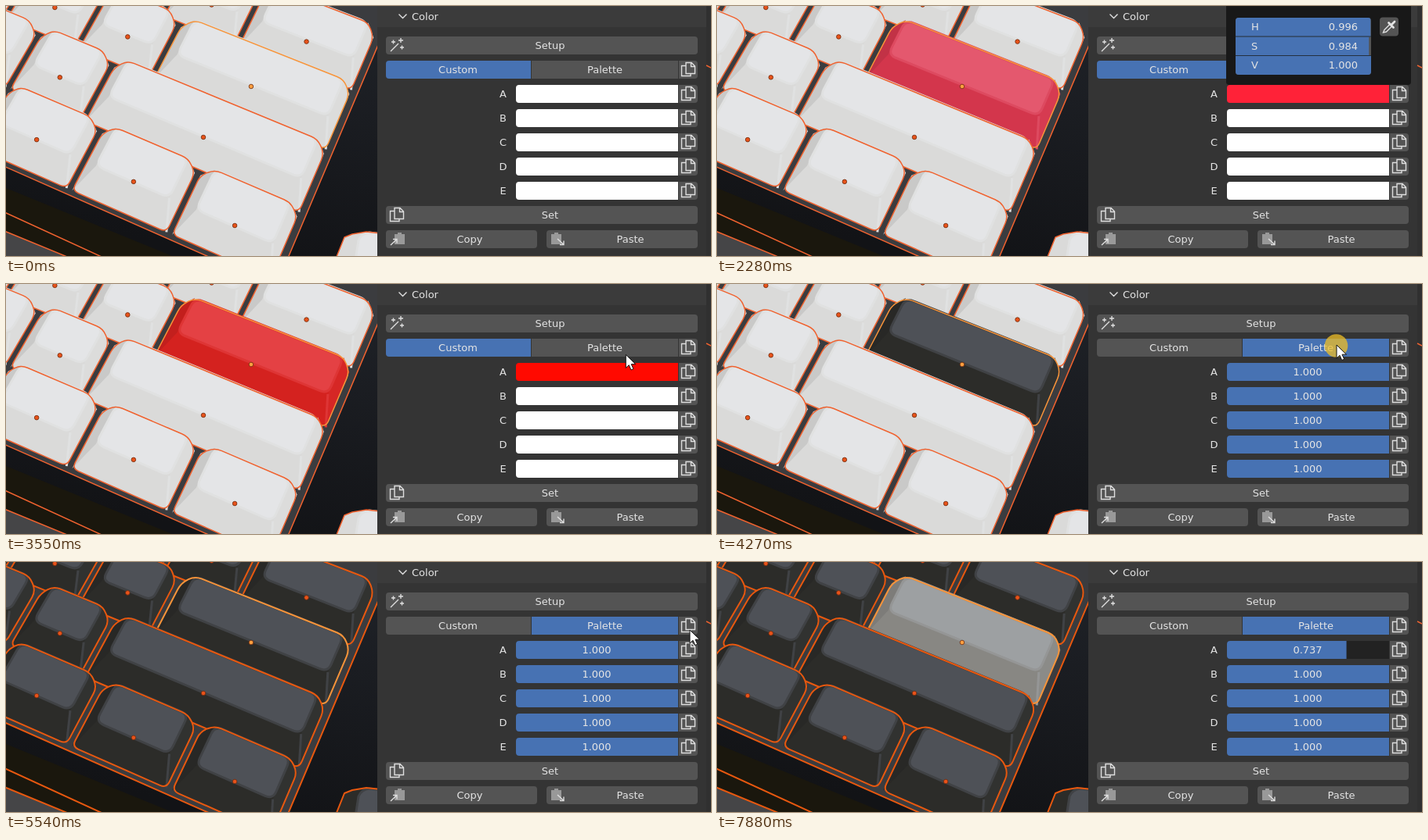
These frames come from a looping animation (900 by 320 pixels, 8 s). An HTML page:

```html
<!DOCTYPE html>
<html lang="en">
<head>
<meta charset="utf-8">
<title>Keycap colors</title>
<style>
  html, body { margin: 0; width: 100%; height: 100%; overflow: hidden; background: #343434; }
  svg { display: block; width: 900px; height: 320px; font: 13px "DejaVu Sans", sans-serif; }
  text { fill: #e4e4e4; white-space: pre; }
  .mid { text-anchor: middle; }
  .end { text-anchor: end; }
  .btn { fill: #545454; }
  .blue { fill: #4772b3; }
  .icon { fill: none; stroke: #dedede; stroke-width: 1.4; }
  .edge { fill: none; stroke: #f0622f; stroke-width: 1.5; stroke-linejoin: round; }
  .dark .edge { stroke: #e8580f; stroke-width: 2; }
  #hero .edge { stroke: #f8943a; }
  .top { fill: var(--top); stroke: var(--rim); stroke-width: 3; }
  .front { fill: var(--front); }
  .right { fill: var(--right); }
  .left { fill: var(--left); }
  .ridge { fill: none; stroke: var(--rim); stroke-width: 3; }
  .dot { fill: #e8531a; stroke: #6b2a10; stroke-width: .8; }
  .dot.on { fill: #ffa040; }
</style>
</head>
<body>
<svg id="stage" viewBox="0 0 900 320" xmlns="http://www.w3.org/2000/svg"></svg>
<script>
const $ = id => document.getElementById(id);
const clamp = x => Math.min(1, Math.max(0, x));
const ease = x => x * x * (3 - 2 * x);
const lerp = (a, b, k) => a + (b - a) * k;

// Perspective view of the key grid: u runs left from the right edge, v counts rows from the front
function project(u, v, lift = 0) {
  const d = 1 - .0178 * u + .028 * v;
  return [(358.8 + 101.6 * u + 46.1 * v) / d + 11 * lift,
          (310 + 41.4 * u - 76.3 * v) / d - 25 * lift];
}

// Corners of one cap layer: back left, back right, front right, front left
function quad(key, du, dv, lift) {
  const { left, right, row } = key;
  return [[left + du, row + .5 - dv], [right - du, row + .5 - dv],
          [right - du, row - .5 + dv], [left + du, row - .5 + dv]].map(([u, v]) => project(u, v, lift));
}

// Closed outline with rounded corners
function rounded(pts, r) {
  const toward = (a, b) => {
    const dx = b[0] - a[0], dy = b[1] - a[1];
    const k = Math.min(r / Math.hypot(dx, dy), .5);
    return (a[0] + dx * k).toFixed(1) + ' ' + (a[1] + dy * k).toFixed(1);
  };
  const n = pts.length;
  return pts.map((p, i) =>
    `${i ? 'L' : 'M'}${toward(p, pts[(i + n - 1) % n])}Q${p} ${toward(p, pts[(i + 1) % n])}`).join('') + 'Z';
}

// Width of the last key in each row, then of the others, front row first
const keys = [[1.25, 1.25], [2.75, 1], [2.25, 1], [1.5, 1]].flatMap(([last, width], row) =>
  [0, 1, 2, 3].map(i => {
    const right = i ? -last - (i - 1) * width : 0;
    return { row, right, left: right - (i ? width : last), hero: row === 2 && i === 0 };
  })).reverse();

function drawCap(key) {
  const base = quad(key, .035, .035, 0), face = quad(key, .165, .19, 1);
  const outline = rounded([base[3], base[0], face[0], face[1], base[1], base[2]], 9);
  return `<g ${key.hero ? 'id="hero"' : ''}>
    <path class="front" d="${outline}"/>
    <polygon class="left" points="${[base[3], base[0], face[0], face[3]].join(' ')}"/>
    <polygon class="right" points="${[face[1], base[1], base[2], face[2]].join(' ')}"/>
    <path class="ridge" d="M${face[2]}L${base[2]}"/>
    <path class="top" d="${rounded(face, 11)}"/>
    <path class="edge" d="${outline}"/></g>`;
}

function drawDot({ left, right, row, hero }) {
  const [x, y] = project((left + right) / 2, row);
  return `<circle class="dot ${hero ? 'on' : ''}" cx="${x}" cy="${y}" r="2.8"/>`;
}

const plate = [project(-7, 5), project(.05, 5), project(.05, -.54), project(-7, -.54)];
const scene = `
  <rect width="474" height="320" fill="url(#floor)"/>
  <path d="M0 233L212 320H0Z" fill="#1a170d"/>
  <path d="M0 289L75 320H0Z" fill="#454547"/>
  <path class="edge" d="M-2 264L122 321M-2 288L78 321"/>
  <polygon class="edge" style="fill:#3b3c3f" points="${plate.join(' ')}"/>
  <path class="front" d="M420 326L432 296 442 292 460 289 480 291V326Z"/>
  <path class="top" d="M446 326L450 300Q454 291 464 290L480 292V326Z"/>
  <path class="edge" d="M420 326L432 296 442 292 460 289 480 291"/>
  ${keys.map(drawCap).join('')}${keys.map(drawDot).join('')}`;

// Panel widgets; y is always the middle of a row
const label = (x, y, s, cls = 'mid', id = '') => `<text id="${id}" class="${cls}" x="${x}" y="${y + 5}">${s}</text>`;
const button = (x, y, w) => `<rect class="btn" x="${x}" y="${y - 11}" width="${w}" height="23" rx="4"/>`;
const leftEnd = (x, y, w, attr) =>
  `<path ${attr} d="M${x + w} ${y - 11}H${x + 4}q-4 0-4 4v15q0 4 4 4H${x + w}Z"/>`;
const pages = (x, y) => `<path class="icon" transform="translate(${x} ${y})"
  d="M-3-8.500H4L8.500-4V5.500H-3ZM3.500-8.500V-3.500H8.500M-3-4.500H-8.500V8.500H3V5.500"/>`;
const copyEnd = y => `<path class="btn" d="M859 ${y - 11}h20q4 0 4 4v15q0 4-4 4h-20Z"/>${pages(871, y)}`;
const clip = (x, y) => `<path fill="#999" d="M${x} ${y - 6}h4v-2h5v2h4v13h-13Z"/>`;
const rows = [...'ABCDE'].map((name, i) => ({ name, y: 112 + 31 * i }));

const panel = `
  <rect x="474" width="426" height="320" fill="#343434"/>
  <rect x="474" width="420" height="27" fill="#3b3b3b"/>
  <rect x="894" width="6" height="320" fill="#303030"/>
  <path class="edge" d="M894 76L900 79"/>
  <path class="icon" d="M501.500 10.500L506.500 15.500 511.500 10.500"/>
  ${label(518, 13, 'Color', '')}
  ${button(485, 50, 398)}${label(694.5, 50, 'Setup')}
  <path class="icon" d="M491 58L501 48M492 46h5M494.500 43.500v5M501 44h6M504 41v6M503 53h5M505.500 50.500v5"/>
  ${leftEnd(485, 81, 185, 'id="tabCustom"')}
  <rect id="tabPalette" x="671" y="70" width="187" height="23"/>
  ${label(577, 81, 'Custom')}${label(764.5, 81, 'Palette')}${copyEnd(81)}
  ${rows.map(({ name, y }) => label(634.5, y, name) + copyEnd(y)).join('')}
  <g id="custom">${rows.map(({ name, y }) => leftEnd(651, y, 207, `id="swatch${name}" fill="#fff"`)).join('')}</g>
  <g id="palette">${rows.map(({ name, y }) =>
    leftEnd(651, y, 207, 'fill="#222"') + leftEnd(651, y, 207, `id="bar${name}" class="blue"`) +
    label(754, y, '1.000', 'mid', 'value' + name)).join('')}</g>
  ${button(485, 267, 398)}${pages(499, 267)}${label(694.5, 267, 'Set')}
  ${button(485, 298, 193)}${clip(496, 298)}${label(592, 298, 'Copy')}
  <path class="icon" d="M491 306L499 298.500M494 298.500H499V303.500"/>
  ${button(690, 298, 193)}${clip(696, 298)}${label(797, 298, 'Paste')}
  <path class="icon" d="M704 298L712 305.500M707 305.500H712V300.500"/>`;

const picker = `<g id="picker">
  <path fill="#181818" d="M650 0H886V97q0 4-4 4H654q-4 0-4-4Z"/>
  <g clip-path="url(#hsvBox)">
    <rect class="btn" x="662" y="15" width="173" height="73"/>
    ${[0, 1, 2].map(i => `<rect id="hsvBar${i}" class="blue" x="662" y="${15 + 24.5 * i}" height="24.500"/>`).join('')}
    <path d="M662 39H835M662 63.500H835" stroke="#24303f"/>
  </g>
  ${[...'HSV'].map((c, i) => label(682, 26 + 24.5 * i, c, '') + label(818, 26 + 24.5 * i, '', 'end', 'hsv' + i)).join('')}
  <rect class="btn" x="846" y="14.500" width="24" height="24" rx="4"/>
  <path class="icon" d="M850.500 34L852 30.500 859 23.500 861.500 26 854.500 33Z"/>
  <path d="M857.500 21.500L863.500 27.500M860.500 24.500L865 20" stroke="#e4e4e4" stroke-width="2.800" stroke-linecap="round"/>
</g>`;

$('stage').innerHTML = `
  <defs>
    <linearGradient id="floor" x1=".9" y1="0" x2=".6" y2="1">
      <stop stop-color="#202329"/><stop offset="1" stop-color="#121316"/>
    </linearGradient>
    <clipPath id="hsvBox"><rect x="662" y="15" width="173" height="73" rx="4"/></clipPath>
    <clipPath id="view"><rect width="474" height="320"/></clipPath>
  </defs>
  <g id="board" clip-path="url(#view)">${scene}</g>${panel}${picker}
  <circle id="ring" r="14.800" fill-opacity=".74"/>
  <path id="cursor" fill="#fff" stroke="#111" stroke-linejoin="round" d="M0 0V17L4 13.300 6.700 19.500 9.700 18.200 7 12.200H12.500Z"/>`;

// Colors as top and front; the other faces follow from these
const paint = {
  white: ['#e4e5e7', '#dadad9'],
  pink: ['#e4586e', '#d3364c'],
  red: ['#e44144', '#d4221f'],
  dark: ['#4e5157', '#2c2c29'],
  grey: ['#9da0a2', '#888783'],
};
const hex = rgb => '#' + rgb.map(c => Math.round(c).toString(16).padStart(2, '0')).join('');
const mix = (a, b, k) => hex([1, 3, 5].map(i =>
  lerp(parseInt(a.slice(i, i + 2), 16), parseInt(b.slice(i, i + 2), 16), k)));
const blend = (a, b, k) => a.map((c, i) => mix(c, b[i], k));

function setPaint(node, [top, front]) {
  const faces = { top, front, rim: mix(top, front, .4), right: mix(front, top, .15), left: mix(front, '#000000', .08) };
  for (const name in faces) node.style.setProperty('--' + name, faces[name]);
}

// Linear-light HSV shown as sRGB
function hsvColor(h, s, v) {
  return hex([0, 4, 2].map(shift => {
    const wave = clamp(Math.abs((h * 6 + shift) % 6 - 3) - 1);
    const c = v * (1 - s + s * wave);
    return 255 * (c < .0031 ? 12.92 * c : 1.055 * c ** (1 / 2.4) - .055);
  }));
}

// Cursor stops: step, x, y; eased in between
const stops = [[2, 818, 212], [6, 700, 104], [10, 700, 104], [13, 775, -24], [20, 775, -24], [23, 792, 126],
  [26, 791, 78], [31, 791, 78], [35, 873, 87], [46, 873, 87], [50, 832, 109]];
const clicks = [8, 30, 37, 50];

function cursorAt(n) {
  const i = stops.findIndex(s => s[0] >= n);
  if (i < 0) return null;
  if (!i) return n < stops[0][0] ? null : stops[0].slice(1);
  const [n0, x0, y0] = stops[i - 1], [n1, x1, y1] = stops[i];
  const k = ease((n - n0) / (n1 - n0));
  return [lerp(x0, x1, k), lerp(y0, y1, k)];
}

const show = (node, on) => { node.style.display = on ? '' : 'none'; };

function render(n) {
  const palette = n >= 30, allDark = n >= 38, picking = n >= 16;
  const pick = clamp((n - 16) / 2), drag = ease(clamp((n - 49) / 6));
  const hsv = picking ? [lerp(.996, 1.000451, pick) % 1, lerp(.984, 1, pick), 1] : [0, 0, 1];
  const a = 1 - .263 * drag;

  $('board').classList.toggle('dark', allDark);
  setPaint($('board'), allDark ? paint.dark : paint.white);
  setPaint($('hero'), palette ? blend(paint.dark, paint.grey, drag)
    : picking ? blend(paint.pink, paint.red, pick) : paint.white);

  $('tabCustom').setAttribute('fill', palette ? '#545454' : '#4772b3');
  $('tabPalette').setAttribute('fill', palette ? '#4772b3' : '#545454');
  show($('custom'), !palette);
  show($('palette'), palette);
  $('swatchA').setAttribute('fill', hsvColor(...hsv));
  $('barA').style.clipPath = `inset(0 ${(1 - a) * 100}% 0 0)`;
  $('valueA').textContent = a.toFixed(3);

  show($('picker'), n >= 9 && n < 24);
  hsv.forEach((v, i) => {
    $('hsv' + i).textContent = v.toFixed(v > 0 && v < .001 ? 6 : 3);
    $('hsvBar' + i).setAttribute('width', 173 * v);
  });

  const at = cursorAt(n);
  show($('cursor'), at);
  show($('ring'), at && clicks.includes(n));
  if (at) {
    $('cursor').setAttribute('transform', `translate(${at})`);
    $('ring').setAttribute('transform', `translate(${at[0] - .5} ${at[1] + 1})`);
    $('ring').setAttribute('fill', palette ? '#f0c026' : '#f2ea10');
  }
}

// The picture moves in steps and rests before the slider is dragged
const STEP = 142, RESUME = 6735;
const stepAt = t => t < RESUME ? Math.min(46, Math.floor(t / STEP)) : 47 + Math.floor((t - RESUME) / STEP);

let shown = -1;
function tick() {
  const n = stepAt(performance.now() % 8000);
  if (n !== shown) render(shown = n);
  requestAnimationFrame(tick);
}
tick();
</script>
</body>
</html>
```
